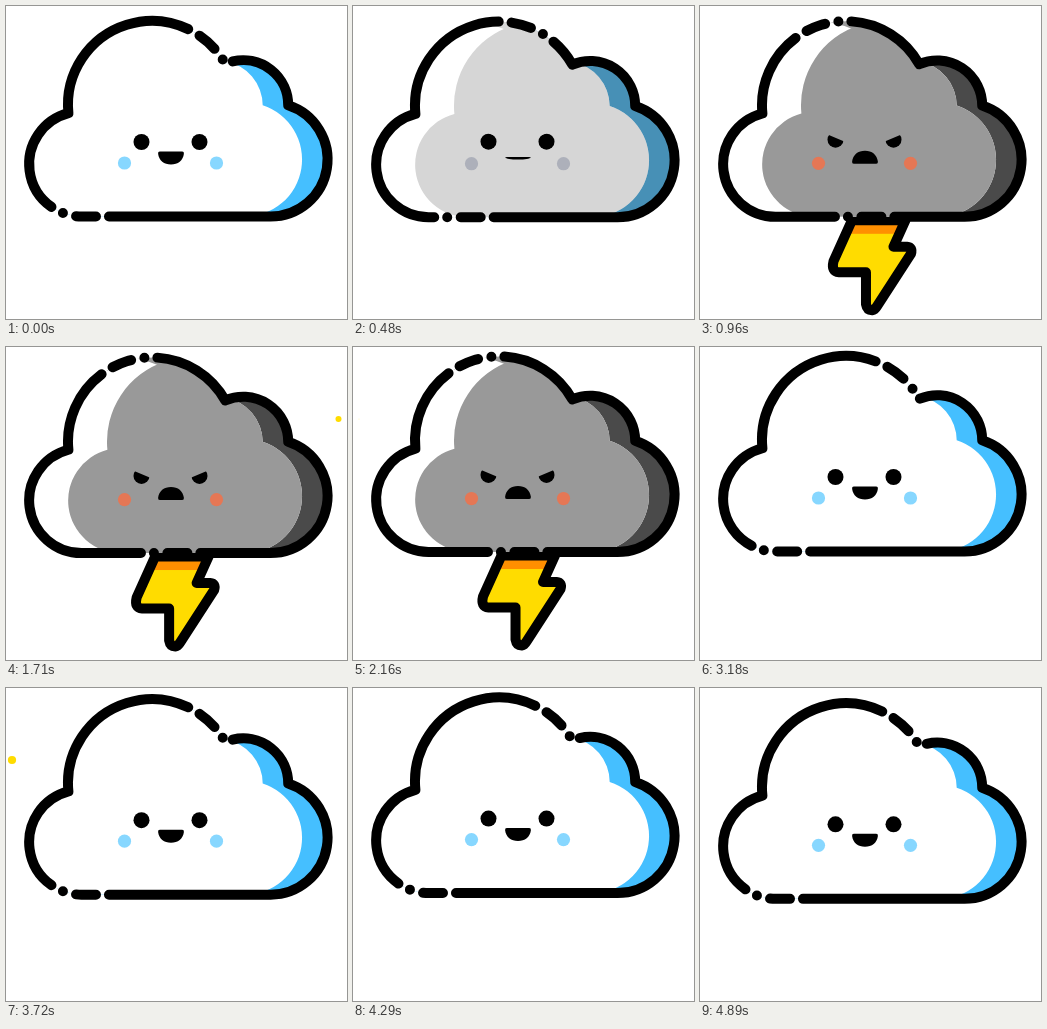
An HTML page that plays this animation: 341 px wide and 313 px high, repeating every 4.92 s.

```html
<!DOCTYPE html>
<html lang="en">
<head>
<meta charset="utf-8">
<title>Moody cloud</title>
<style>
  html, body { margin: 0; width: 100%; height: 100%; overflow: hidden; background: #fff; }
  svg { display: block; width: 100%; height: 100%; }
  .line { stroke: #000; stroke-width: 10; stroke-linecap: round; stroke-linejoin: round; }
</style>
</head>
<body>
<svg viewBox="0 0 341 313">
  <defs>
    <path id="cloud" pathLength="820" d="M75.5 210.5H264.5A57 57 0 0 0 282.2 99.3A45 45 0 0 0 219.3 57.9A84 84 0 0 0 62.4 107.2A52.5 52.5 0 0 0 75.5 210.5Z"/>
    <path id="front" d="M75.5 210.5H239A57 57 0 0 0 256.7 99.3A45 45 0 0 0 219.3 55.2V57.9A84 84 0 0 0 62.4 107.2A52.5 52.5 0 0 0 75.5 210.5Z"/>
    <path id="boltShape" d="M151 214L132.5 255Q130 265.5 138 266H165V298Q166 304 171 304Q174 303.5 176 300L210 247.5Q212 241 206 240.5H192.5L204.5 214Z"/>
    <clipPath id="inCloud"><use href="#cloud"/></clipPath>
    <clipPath id="inFront"><use href="#front"/></clipPath>
    <clipPath id="inBolt"><use href="#boltShape"/></clipPath>
    <clipPath id="lid"><rect id="lidRect" x="-20" width="40" height="40" transform="rotate(23)"/></clipPath>
    <g id="eye" clip-path="url(#lid)"><circle id="pupil" r="8"/></g>
    <circle id="cheek" r="6.6"/>
  </defs>

  <g id="pops" fill="#ffdc00"></g>

  <g id="bob">
    <g id="bolt">
      <use href="#boltShape" fill="#ffdc00"/>
      <rect id="boltShade" x="125" y="208" width="90" height="19.5" fill="#ff8f00" clip-path="url(#inBolt)"/>
      <use href="#boltShape" class="line" fill="none"/>
    </g>
    <g clip-path="url(#inCloud)">
      <use id="shade" href="#cloud"/>
      <use href="#front" fill="#fff"/>
      <g id="gloom" fill="#999" clip-path="url(#inFront)">
        <use href="#cloud" x="39"/>
        <path d="M133 17Q144 19 153 23L175 25L160 12Z"/>
      </g>
    </g>
    <use id="outline" href="#cloud" class="line" fill="none"
         stroke-dasharray="404 13 0 13.5 20 13 297 13 0 13.5 20 13"/>
    <use href="#eye" transform="translate(135.5 136)"/>
    <use href="#eye" transform="translate(193.5 136) scale(-1 1)"/>
    <path id="mouth" d="M-11.2 -6.5H11.2Q13.2 -6.5 12.9 -4.3C12 2.5 7 6.5 0 6.5S-12 2.5 -12.9 -4.3Q-13.2 -6.5 -11.2 -6.5Z"/>
    <g id="cheeks">
      <use href="#cheek" x="118.5" y="157"/>
      <use href="#cheek" x="210.5" y="157"/>
    </g>
  </g>
</svg>
<script>
const LOOP = 4920, BOB = LOOP / 5, POP_LIFE = 450;
const $ = id => document.getElementById(id);
const set = (id, name, value) => $(id).setAttribute(name, value);
const clamp = v => Math.max(0, Math.min(1, v));
const smooth = v => v * v * (3 - 2 * v);
const span = (t, from, to) => clamp((t - from) / (to - from));
const hump = (t, start, life) => Math.sin(Math.PI * span(t, start, start + life));
const lerp = (a, b, k) => a + (b - a) * k;
const mix = (a, b, k) => `rgb(${a.map((v, i) => Math.round(lerp(v, b[i], k)))})`;

// phase, vertical offset
const hops = [[0, 0], [.24, -6], [.33, -6], [.5, .8], [.665, -4.5], [.725, -4.5], [.965, .4], [1, 0]];
function bobAt(t) {
  const p = t % BOB / BOB;
  const i = hops.findIndex(h => h[0] > p);
  const [[p0, y0], [p1, y1]] = [hops[i - 1], hops[i]];
  return lerp(y0, y1, smooth((p - p0) / (p1 - p0)));
}

// start, x, y, radius
const pops = [
  [1200, 335, 5, 5.5], [1350, 332.5, 72, 5.2], [1720, 6, 72, 5.5],
  [3600, 6, 72, 5.5], [4370, 335, 5, 5.5], [4400, 332.5, 72, 5.2]
].map(([start, cx, cy, r]) => {
  const dot = document.createElementNS("http://www.w3.org/2000/svg", "circle");
  dot.setAttribute("cx", cx);
  dot.setAttribute("cy", cy);
  $("pops").append(dot);
  return { dot, start, r };
});

// 0 is happy, 1 is angry
const mood = (t, rise, riseEnd, fall, fallEnd) =>
  smooth(span(t, rise, riseEnd)) - smooth(span(t, fall, fallEnd));

function draw(t) {
  const travel = mood(t, 150, 900, 2555, 3311);
  const anger = mood(t, 350, 650, 2630, 2930);
  const swell = 1 + .23 * (hump(t, 270, 200) + hump(t, 2550, 200));
  const bob = bobAt(t);

  set("bob", "transform", `translate(0 ${bob})`);
  set("outline", "stroke-dashoffset", -27.5 - 91.5 * travel);
  set("shade", "fill", mix([69, 191, 255], [74, 74, 74], anger));
  set("gloom", "opacity", anger);
  set("cheeks", "fill", mix([135, 215, 255], [229, 119, 85], anger));
  set("cheek", "r", 6.6 * swell);
  set("pupil", "cy", -2.6 * anger);
  set("lidRect", "y", lerp(-12, -4.1, anger));
  set("mouth", "transform",
    `translate(165 ${152 - anger}) scale(${swell} ${swell * (1 - 2 * anger)})`);

  // the bolt sways sideways as the cloud bobs
  const drop = 1 - (1 - span(t, 640, 900)) ** 3;
  const fade = t < 640 ? 0 : 1 - span(t, 2550, 2650);
  set("bolt", "transform", `translate(${.8 + .6 * bob} ${-100 * (1 - drop)})`);
  set("bolt", "opacity", fade);
  set("boltShade", "opacity", clamp(2 * fade - 1));

  for (const { dot, start, r } of pops) {
    dot.setAttribute("r", r * hump(t, start, POP_LIFE));
  }
}

const began = performance.now();
function tick() {
  draw((performance.now() - began) % LOOP);
  requestAnimationFrame(tick);
}
tick();
</script>
</body>
</html>
```
